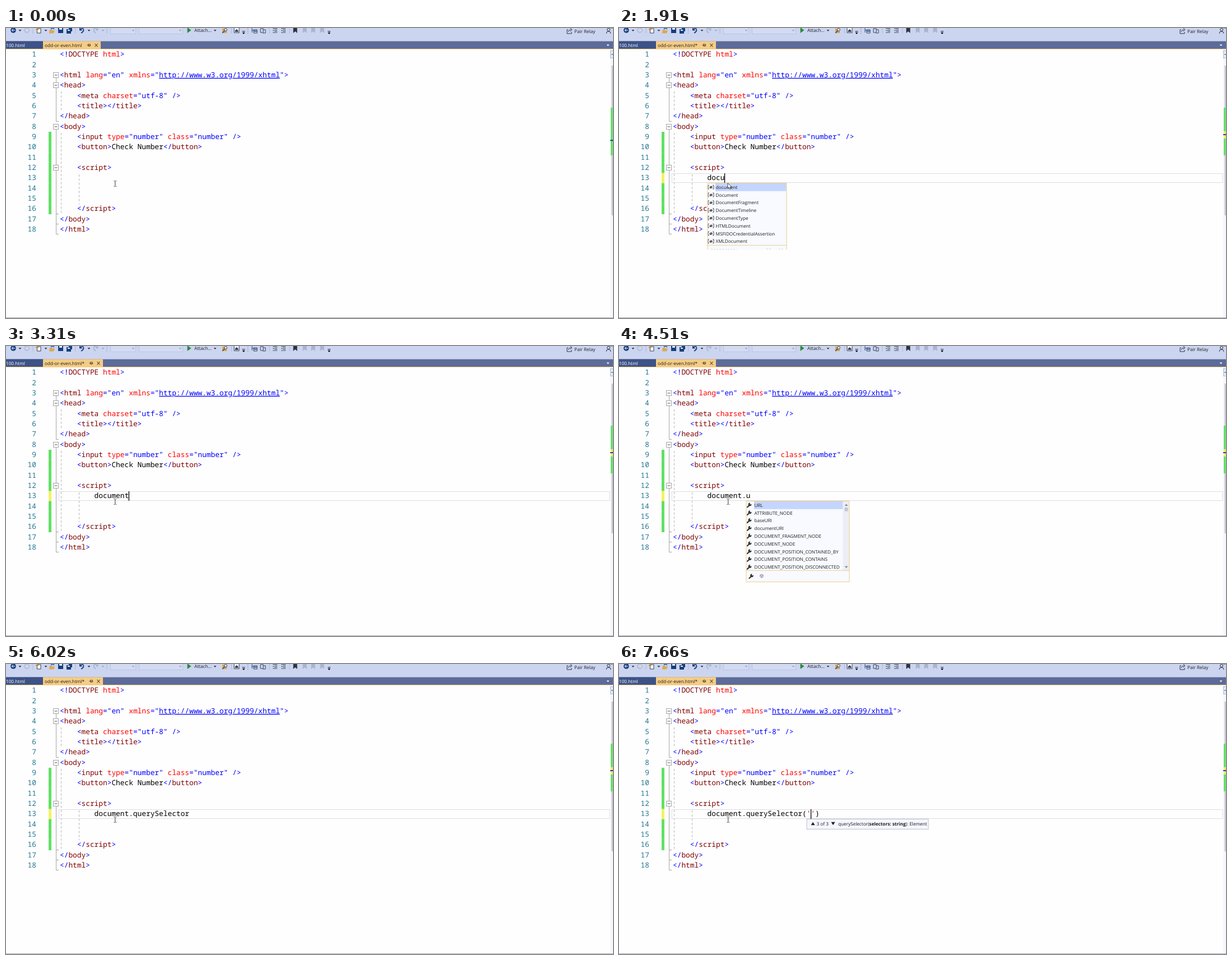
An HTML page that plays this animation: 1083x517 px, repeating every 8 s.

```html
<!DOCTYPE html>
<html lang="en">
<head>
<meta charset="utf-8">
<title>Editor typing</title>
<style>
  html, body { margin: 0; width: 100%; height: 100%; overflow: hidden; background: #fefefe; }
  svg { display: block; }
  text { white-space: pre; text-rendering: geometricPrecision; }
  .code { font: 12.83px "Noto Sans Mono", monospace; }
  .ui { font: 8.2px "Open Sans", "Noto Sans", sans-serif; fill: #1e1e1e; }
  .num { fill: #237893; text-anchor: end; }
  .blue { fill: #0000ff; }
  .tag { fill: #800000; }
  .attr { fill: #ff0000; }
  .str { fill: #a31515; }
  .link { text-decoration: underline; }
  .fold { stroke: #a5a5a5; fill: none; }
  .guide { stroke: #b4b4b4; stroke-dasharray: 4 3.3; }
</style>
</head>
<body>
<svg width="1083" height="517" viewBox="0 0 1083 517">
  <defs>
    <path id="tri" d="M-2.5 -1.2h5L0 1.5z"/>
    <g id="cube" fill="none" stroke="#7b5c9e" stroke-width=".8">
      <path d="M0 -3L2.7 -1.6V1.5L0 3L-2.7 1.5V-1.6zM-2.7 -1.6L0 -.2L2.7 -1.6M0 -.2V3"/>
    </g>
    <g id="wrench">
      <path d="M-3.5 3.5L.8 -.8" stroke="#333" stroke-width="2.2" stroke-linecap="round"/>
      <path d="M3.9 -2.2A3 3 0 1 1 1.6 -4.3L1 -2L2 -1z" fill="#333"/>
    </g>
    <g id="symbol" fill="none" stroke="#333" stroke-width=".9">
      <path d="M-3.2 -3.5H-5V3.2H-3.2M3.2 -3.5H5V3.2H3.2"/>
      <path d="M-2.4 -.6L.4 -2.2L2.6 -1.2V.8L-.4 2.4L-2.4 1.2z" fill="#333" stroke="none"/>
      <path d="M-1.6 -.4L0 .3L1.8 -.7" stroke="#fff" stroke-width=".6"/>
    </g>
    <path id="star" d="M0 -3.6L1 -1.1L3.5 -1.1L1.5 .5L2.2 3L0 1.5L-2.2 3L-1.5 .5L-3.5 -1.1L-1 -1.1z" fill="#1e1e1e"/>
    <path id="mark" d="M-3.5 -5H3.5V5L0 2L-3.5 5z"/>
    <g id="overflow"><path d="M-2.5 1h5L0 4zM-2.5 -1.5h5v1h-5z"/></g>
    <g id="lines" fill="none" stroke="#3a4258"><path d="M-4 -3.5H4M-1 -1H4M-1 1.5H4M-4 4H4"/><path d="M-4 .2H-1.5" stroke="#2f8f46" stroke-width="1.6"/></g>
  </defs>

  <rect width="1083" height="517" fill="#fefefe"/>

  <!-- toolbar -->
  <rect width="1083" height="23.5" fill="#ccd5f0"/>
  <circle cx="13" cy="4" r="4.8" fill="#173f7c"/>
  <path d="M16 4H10.5M13 1.5L10.3 4L13 6.5" stroke="#fff" fill="none"/>
  <circle cx="37" cy="4" r="4.3" fill="#c3cbe2" stroke="#aab3cc"/>
  <path d="M34.5 4H39.5M37.5 2L39.7 4L37.5 6" stroke="#e6ebf8" fill="none"/>
  <path d="M48 0V10M123.5 0V10M180 0V10M402.500 0V10M470 0V10M506 0V10" stroke="#aeb9da"/>
  <path d="M55.500 1H62V9H55.500z" fill="#f3f4fa" stroke="#3a4258"/>
  <path d="M53 2.500H58M55.500 0V5" stroke="#c98118" stroke-width="1.6"/>
  <path d="M78 3H82L83 4.500H87L85 9.500H77z" fill="#dca850"/>
  <path d="M80 2Q83 -1 86 2" stroke="#1b5fa8" stroke-width="1.5" fill="none"/>
  <g fill="#173f7c">
    <path d="M93 0H102V9H93zM108 2H116V10H108zM112 -1H118V6H112z"/>
    <path d="M131 -1L131 4.500H136.500z"/>
  </g>
  <path d="M95 0H100V3H95zM110 3H114V5H110z" fill="#e6ebf8"/>
  <path d="M132 3Q138 -2 138.500 4Q138 7 134 9" fill="none" stroke="#173f7c" stroke-width="1.7"/>
  <path d="M163 3Q157 -2 156.500 4Q157 7 160 9" fill="none" stroke="#aab3cc" stroke-width="1.7"/>
  <path d="M164.500 -1V4.500H159.500z" fill="#aab3cc"/>
  <g fill="#d3dbf3" stroke="#b9c4e3"><rect x="186.500" y="-3" width="45" height="13.500"/><rect x="237.500" y="-3" width="78" height="13.500"/></g>
  <path d="M323.500 -1L330.500 4L323.500 9z" fill="#2c8a3e"/>
  <text class="ui" x="336" y="7.300">Attach...</text>
  <path d="M386 1H394V9H386z" fill="#d9a044"/><circle cx="392" cy="3" r="2.400" fill="#e6ebf8" stroke="#3a4258"/>
  <path d="M386 9L390 5" stroke="#3a4258" stroke-width="1.400"/>
  <path d="M407 -1H416V8.500H407z" fill="#edf0fa" stroke="#3a4258"/>
  <path d="M408.500 5L411.500 2L414.500 5V7H408.500z" fill="#3a4258"/>
  <path d="M431.500 0V11" stroke="#8c98bd" stroke-width="2" stroke-dasharray="1 2"/>
  <g fill="none" stroke="#3a4258"><path d="M439 0V8M439 4H442M442 3H448V9H442zM454 1H459V8H454zM459 3H463V9H458"/><path d="M442 5.500H448" stroke="#1b5fa8" stroke-width="2"/></g>
  <use href="#lines" x="480" y="4"/><use href="#lines" x="495" y="4"/>
  <use href="#mark" x="516" y="4" fill="#2d3140"/>
  <g fill="#a9b3cf"><use href="#mark" x="533" y="4"/><use href="#mark" x="548" y="4"/><use href="#mark" x="564" y="4"/></g>
  <use href="#overflow" x="424" y="7"/><use href="#overflow" x="576.500" y="7"/>
  <g fill="#2d3140"><use href="#tri" x="25" y="4.500"/><use href="#tri" x="71" y="4.500"/><use href="#tri" x="148" y="4.500"/><use href="#tri" x="373" y="4.500"/></g>
  <g fill="#9da7c4"><use href="#tri" x="173" y="4.500"/><use href="#tri" x="227" y="4.500"/><use href="#tri" x="311" y="4.500"/></g>
  <path d="M1003 3H1001V10H1009V7M1003 7Q1004 3 1008 3M1006.500 0L1010 3L1006.500 6" fill="none" stroke="#2d3140"/>
  <text class="ui" x="1014" y="8.600">Pair Relay</text>
  <g fill="none" stroke="#2d3140"><circle cx="1075" cy="3" r="2.500"/><path d="M1071 10Q1071 6 1075 6Q1079 6 1079 10M1078 0H1083"/></g>

  <!-- tabs -->
  <rect y="23.500" width="1083" height="14.500" fill="#5d6b99"/>
  <rect y="23.500" width="66" height="13.500" fill="#3d5286"/>
  <rect y="37" width="1083" height="1" fill="#f5cc84"/>
  <text class="ui" x="0" y="33.500" style="fill:#fff">100.html</text>
  <rect id="tab" x="66" y="23.500" width="103" height="14.500" fill="#f5cc84"/>
  <text class="ui" id="tabName" x="69" y="33.800">odd-or-even.html</text>
  <g id="tabTools" fill="none" stroke="#4b4330"><path d="M144.500 30.500H147M147 28V33M147 29H150.500V32H147M147 31.500H150.500"/><path d="M158.500 28L163.500 33.500M163.500 28L158.500 33.500" stroke-width="1.100"/></g>
  <use href="#tri" x="1074" y="30.800" fill="#fff"/>

  <!-- change bars and folding -->
  <rect x="76" y="185" width="5" height="147" fill="#62e065"/>
  <path d="M76 203.400h5M76 221.700h5M76 240h5M76 258.400h5M76 276.700h5M76 295h5M76 313.400h5" stroke="#82e785" stroke-width=".6"/>
  <rect id="unsaved" x="76" y="258.400" width="5" height="18.200" fill="#f6f062"/>
  <path class="fold" d="M89.500 89V98M89.500 107V166.500H94M89.500 180V244M89.500 254V331.500H94M89.500 331V367.500H94M89.500 349.500H94"/>
  <path class="guide" d="M98.500 113V149M98.500 187V332M130.500 261V314"/>
  <g id="folds"></g>

  <!-- scrollbar -->
  <rect x="1078" y="38" width="5" height="478" fill="#f5f6fa"/>
  <rect x="1078.500" y="40.500" width="6" height="13" fill="#e3e9f8" stroke="#a9b8dc"/>
  <path d="M1080 47H1083" stroke="#3a4258"/>
  <rect x="1080.500" y="67" width="2.500" height="267" fill="#c4c6d0"/>
  <rect x="1079" y="142" width="3.500" height="85" fill="#62e065"/>
  <rect id="unsavedMark" x="1079" y="184" width="3.500" height="13" fill="#f6f062"/>
  <rect id="posMark" x="1078" y="199.500" width="5" height="1.700" fill="#1414c8"/>
  <path d="M0 516.500H1083" stroke="#a4a7b3"/>

  <rect id="line" x="94.500" y="259.500" width="982.500" height="16" fill="none" stroke="#dedee4"/>
  <g class="code" id="lines18"></g>
  <text class="code" id="typed" x="157.600" y="271.400"></text>
  <rect id="caret" y="259" width="1.300" height="17" fill="#000"/>
  <g class="ui" id="popup"></g>
  <path id="beam" d="M192.500 272.500H194M195.500 272.500H197M194.750 273V282M192.500 282.500H194M195.500 282.500H197" fill="none" stroke="#333"/>
  <path id="arrow" d="M194 276.500V286L196.300 284L198 287.500L199.500 286.800L198 283.500H201z" fill="#fff" stroke="#222" stroke-width=".8"/>
</svg>

<script>
const $ = id => document.getElementById(id);
const PITCH = 7.7, ROW = 18.34;
const rowY = n => 51.3 + ROW * (n - 1);
const esc = s => s.replace(/&/g, '&amp;').replace(/</g, '&lt;');
const span = (cls, s) => `<tspan class="${cls}">${esc(s)}</tspan>`;

const source = `<!DOCTYPE html>

<html lang="en" xmlns="http://www.w3.org/1999/xhtml">
<head>
    <meta charset="utf-8" />
    <title></title>
</head>
<body>
    <input type="number" class="number" />
    <button>Check Number</button>

    <script>



    <\/script>
</body>
</html>`.split('\n');

function highlight(line) {
  const token = /(<[!\/]?)(\w+)|(\w+)(?==)|(html)(?=>)|="(http[^"]+)"|(="[^"]*"|\/?>)/g;
  return line.replace(token, (all, open, tag, attr, kind, url, rest) =>
    open ? span('blue', open) + span('tag', tag)
    : attr || kind ? span('attr', attr || kind)
    : url ? span('blue', '="') + span('blue link', url) + span('blue', '"')
    : span('blue', rest));
}

$('lines18').innerHTML = source.map((line, i) =>
  `<text class="num" x="54" y="${rowY(i + 1)}">${i + 1}</text>` +
  `<text x="96" y="${rowY(i + 1)}">${highlight(line)}</text>`).join('');

$('folds').innerHTML = [3, 4, 8, 12].map(n => {
  const y = Math.round(rowY(n) - 4) - .5;
  return `<rect class="fold" x="84.5" y="${y - 4}" width="9" height="9" style="fill:#fefefe"/>
    <path d="M86.500 ${y + .5}H91.500" stroke="#555"/>`;
}).join('');

const STEP = 13.79;
const use = (id, x, y) => `<use href="#${id}" x="${x}" y="${y}"/>`;
const box = (x, y, w, h, fill) => `<rect x="${x}" y="${y}" width="${w}" height="${h}" fill="${fill}"/>`;

// Completion list; a leading * marks a starred suggestion.
function list(x, w, icon, items, { bar = true, cut = false } = {}) {
  const foot = 276 + items.length * STEP + (cut ? 1 : 0);
  const bottom = cut ? 395 : 420.5;
  const inner = w - (bar ? 12 : 1);
  let s = box(x, 276, w, bottom - 276, '#f8faff') + box(x + 14.500, 277, inner - 14.500, 13.800, '#c4d5ff');
  items.forEach((item, i) => {
    const y = 283.8 + i * STEP, starred = item[0] === '*';
    s += use(icon, x + (icon === 'symbol' ? 6.5 : icon === 'wrench' ? 6 : 4.500), y);
    if (starred) s += use('star', x + 18.700, y);
    s += `<text x="${x + (starred ? 25 : 15)}" y="${y + 3.1}">${item.replace('*', '')}</text>`;
  });
  if (bar) {
    const bx = x + w - 12, mid = bx + 6;
    s += box(bx, 277, 11.500, foot - 277, '#eceef5') + box(mid - 3, 288, 6, 6.500, '#c3c5cf') +
      `<path d="M${mid - 3} 285h6l-3 -3.500zM${mid - 3} 392.500h6l-3 3.500z" fill="#858995"/>`;
  }
  s += cut
    ? `<path d="M164 394.500h46M263 394h9M285 394h9" stroke="#d4d6de" stroke-dasharray="3 2"/>`
    : use('wrench', x + 9.500, 410.500) + use('cube', x + 28, 410);
  const frame = `M${x + .5} ${bottom}V276.500H${x + w - .5}V${bottom}`;
  return s + `<path d="${frame}${cut ? '' : 'z'}M${x} ${foot}h${w}" fill="none" stroke="#ecd08c"/>`;
}

const docItems = ['document', 'Document', 'DocumentFragment', 'DocumentTimeline', 'DocumentType',
  'HTMLDocument', 'MSFIDOCredentialAssertion', 'XMLDocument'];
const queryItems = ['*querySelector', ...['Enabled', 'Indeterm', 'State', 'Supported', 'Value'].map(s => 'queryCommand' + s),
  'querySelector', 'querySelectorAll', '*createElement'];
const urlItems = ['URL', 'ATTRIBUTE_NODE', 'baseURI', 'documentURI',
  ...['FRAGMENT_NODE', 'NODE', 'POSITION_CONTAINED_BY', 'POSITION_CONTAINS', 'POSITION_DISCONNECTED'].map(s => 'DOCUMENT_' + s)];

const popups = {
  none: '',
  first: list(157.5, 142, 'symbol', [...docItems, 'DOMError']),
  doc: list(157.5, 142, 'symbol', docItems, { bar: false, cut: true }),
  query: list(226.5, 132, 'cube', queryItems),
  url: list(226.5, 185, 'wrench', urlItems),
  wide: list(226.5, 185, 'cube', queryItems),
  hint: `<rect x="335" y="276.500" width="217" height="18" fill="#f5f6fc" stroke="#bcc0d2"/>
    <path d="M342.500 287.300h7l-3.500 -5.500zM378.500 281.800h7l-3.500 5.500z" fill="#1e1e1e"/>
    <text x="352.500" y="287.700">3 of 3</text>
    <text x="391" y="287.700">querySelector(<tspan font-weight="700">selectors: string</tspan>): Element</text>`
};

// time, text before the caret, caret shown, popup, text after the caret
const d = 'document', q = d + '.querySelector';
const steps = [
  [0, '', 0, 'none'],
  [680, '', 1, 'none'],
  [1110, '', 0, 'none'],
  [1510, '', 1, 'none'],
  [1630, 'd', 0, 'none'],
  [1770, 'do', 0, 'first'],
  [1910, 'docu', 1, 'doc'],
  [2050, 'docum', 1, 'doc'],
  [2180, 'docume', 1, 'doc'],
  [2330, d, 1, 'doc'],
  [2450, d + '.q', 1, 'none'],
  [2870, d + '.q', 1, 'query'],
  [3020, d + '.q', 0, 'query'],
  [3160, d + '.', 1, 'query'],
  [3310, d, 1, 'none'],
  [3730, d + '.', 1, 'none'],
  [3870, d + '.u', 1, 'none'],
  [3990, d + '.u', 1, 'url'],
  [4510, d + '.u', 0, 'url'],
  [4790, d + '.', 1, 'url'],
  [4920, d + '.q', 1, 'wide'],
  [5350, d + '.q', 0, 'wide'],
  [5500, q, 1, 'none'],
  [6020, q, 0, 'none'],
  [6300, q + '(', 1, 'hint', ')'],
  [6730, q + "('", 1, 'hint', "')"],
  [7260, q + "('", 0, 'hint', "')"],
  [7660, q + "('", 1, 'hint', "')"]
];

const show = (id, on) => $(id).setAttribute('visibility', on ? 'visible' : 'hidden');

function draw([time, before, caret, popup, after = '']) {
  const active = time >= 680, dirty = time >= 1630;
  const overList = popup === 'first' || popup === 'doc';
  $('typed').innerHTML = (before + after).replace(/'+/, s => span('str', s));
  $('caret').setAttribute('x', 157.1 + before.length * PITCH);
  $('popup').innerHTML = popups[popup];
  $('posMark').setAttribute('y', active ? 189.3 : 199.5);
  $('tab').setAttribute('width', dirty ? 107 : 103);
  $('tabName').textContent = 'odd-or-even.html' + (dirty ? '*' : '');
  $('tabTools').setAttribute('transform', `translate(${dirty ? 4 : 0})`);
  show('caret', caret);
  show('line', active);
  show('unsaved', dirty);
  show('unsavedMark', dirty);
  show('arrow', overList);
  show('beam', !overList);
}

let current;
function tick() {
  const t = performance.now() % 8000;
  const step = steps.findLast(s => s[0] <= t);
  if (step !== current) draw(current = step);
  requestAnimationFrame(tick);
}
tick();
</script>
</body>
</html>
```
